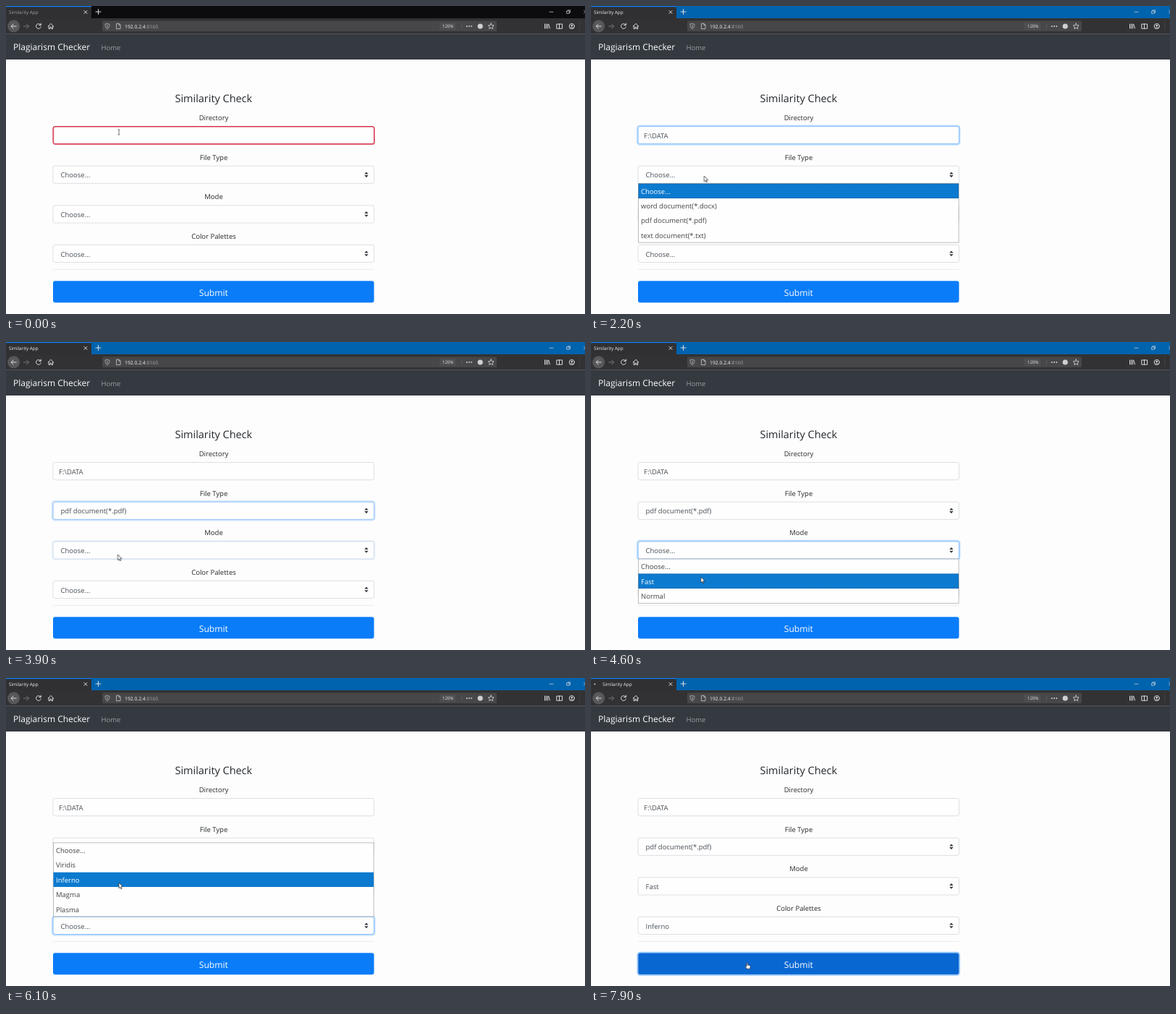
An HTML page that plays this animation: 800 px wide and 426 px high, repeating every 8000 ms.

```html
<!DOCTYPE html>
<html lang="en">
<head>
<meta charset="utf-8">
<title>Similarity App</title>
<style>
html, body { margin: 0; width: 100%; height: 100%; overflow: hidden; background: #fdfdfd; }
svg { display: block; width: 100%; height: 100%; }
text { font: 9.5px "Open Sans", "Noto Sans", sans-serif; fill: #24282c; text-rendering: geometricPrecision; white-space: pre; }
.mid { text-anchor: middle; }
.field { fill: #fefefe; stroke: #d3d8dd; stroke-width: .8; }
.value { fill: #495057; }
.item { fill: #444; }
.hot .item { fill: #fff; }
.icon { fill: none; stroke: #dcdcdd; stroke-width: 1; stroke-linecap: round; stroke-linejoin: round; }
.step, .fade, #pointer { animation: 8s step-end -20ms infinite; }
.fade { animation-timing-function: linear; }
#tabText { animation-name: tabText; }
#pointer { animation-name: pointer; }

@keyframes tabText {
  0% { fill: #a2a2a4; transform: none; }
  1.25% { fill: #f2f2f2; transform: none; }
  98.75%, 100% { fill: #f2f2f2; transform: translateX(12px); }
}
/* each leg advances once every 100 ms */
@keyframes pointer {
  0% { transform: translate(156px, 174.5px); }
  21.25% { transform: translate(156px, 174.5px); animation-timing-function: steps(5); }
  27.5% { transform: translate(156.3px, 235px); }
  31.25% { transform: translate(156.3px, 235px); animation-timing-function: steps(5); }
  37.5% { transform: translate(154.5px, 292px); }
  46.25% { transform: translate(154.5px, 294px); }
  52.5% { transform: translate(154.5px, 294px); animation-timing-function: steps(4); }
  57.5% { transform: translate(151.8px, 325px); }
  60% { transform: translate(151.8px, 325px); animation-timing-function: steps(3); }
  63.75% { transform: translate(157.5px, 338px); }
  72.5% { transform: translate(157.8px, 324.5px); animation-timing-function: steps(3); }
  76.25% { transform: translate(156px, 283px); }
  85% { transform: translate(156px, 283px); animation-timing-function: steps(5); }
  91.25% { transform: translate(211.7px, 384px); animation-timing-function: steps(3); }
  95%, 100% { transform: translate(215.7px, 393.3px); }
}
</style>
</head>
<body>
<svg id="stage" viewBox="0 0 800 426" xmlns="http://www.w3.org/2000/svg"></svg>
<script>
const LOOP = 8000, LEFT = 65, WIDE = 443.5, ROW = 20.4;
const at = ms => ms / LOOP * 100 + '%';
let css = '', id = 0;

const addKeys = body => {
  const name = 'k' + id++;
  css += `@keyframes ${name}{${body}}`;
  return `style="animation-name:${name}"`;
};

// visible from a to b with hard edges
const show = (a, b, inner) => `<g class="step" ${addKeys(
  `0%{opacity:0}${at(a)}{opacity:1}${at(b)}{opacity:0}100%{opacity:0}`)}>${inner}</g>`;

// visible from a to b, taking 100 ms to come and go
const fade = (a, b, inner) => `<g class="fade" ${addKeys(
  `0%,${at(a)}{opacity:0}${at(a + 100)},${at(b)}{opacity:1}${at(b + 100)},100%{opacity:0}`)}>${inner}</g>`;

const text = (x, y, str, cls = '', extra = '') => `<text x="${x}" y="${y}" class="${cls}" ${extra}>${str}</text>`;
const sized = px => `style="font-size:${px}px"`;
const rect = (x, y, w, h, attrs) => `<rect x="${x}" y="${y}" width="${w}" height="${h}" ${attrs}/>`;
const icon = (d, attrs = '') => `<path class="icon" d="${d}" ${attrs}/>`;
const label = (y, str) => text(287, y, str, 'mid');
const box = y => rect(LEFT, y, WIDE, 24.2, 'rx="2.5" class="field"');

const ring = (y, a, b) => fade(a, b,
  rect(LEFT - 1, y - 1, WIDE + 2, 26.2, 'rx="3.5" fill="none" stroke="#bfdeff" stroke-width="2"') +
  rect(LEFT, y, WIDE, 24.2, 'rx="2.5" fill="none" stroke="#80bdff" stroke-width=".9"'));

const select = (y, pick, when) => box(y) +
  show(0, when, text(75.5, y + 16.2, 'Choose...', 'value')) +
  show(when, LOOP, text(75.5, y + 16.2, pick, 'value')) +
  `<path fill="#343a40" d="M495.2 ${y + 11.3}l2.7-3.1 2.7 3.1zM495.2 ${y + 12.9}l2.7 3.1 2.7-3.1z"/>`;

// open list; moves holds [time, row] pairs of the highlight
const list = (y, open, close, items, moves) => {
  const h = items.length * ROW, clip = 'clip' + id;
  const rows = items.map((s, i) => text(69, y + i * ROW + 14, s, 'item')).join('');
  const keys = addKeys(moves.map(([t, r]) => `${at(t)}{transform:translateY(${r * ROW}px)}`).join(''));
  return show(open, close,
    rect(LEFT + .4, y, WIDE - .8, h, 'fill="#fefefe" stroke="#a9abad" stroke-width=".8"') + rows +
    `<clipPath id="${clip}">${rect(LEFT, y, WIDE, ROW, 'class="step" ' + keys)}</clipPath>
     <g class="hot" clip-path="url(#${clip})">${rect(LEFT + .5, y, WIDE - 1, h, 'fill="#0c7acf"')}${rows}</g>`);
};

const dotted = (y, h) => rect(LEFT + .8, y, WIDE - 1.6, h,
  'fill="none" stroke="#164f80" stroke-width=".7" stroke-dasharray="1 1"');

const browser = () =>
  rect(0, 0, 800, 18, 'fill="#0c0c0e"') +
  show(100, LOOP, rect(118, 0, 682, 18, 'fill="#0063ae"')) +
  rect(0, 0, 118, 18, 'fill="#303033"') +
  rect(0, 0, 118, 1.2, 'fill="#0a84ff"') +
  rect(0, 17, 800, 21.5, 'fill="#323235"') +
  text(4, 10.6, 'Similarity App', 'step', 'id="tabText" font-size="6.3"').replace('font-size="6.3"', sized(6.3)) +
  show(7900, LOOP, '<circle cx="5.3" cy="8.5" r="1" fill="#c9d3dd"/>') +
  icon('M108 6.5l4 4m0-4l-4 4', 'stroke-width=".8"') +
  icon('M124 8h7m-3.5-3.5v7') +
  icon('M751 8.2h5M775 7h3.3v3.3H775zM776.3 7V5.7h3.3V9h-1.2M798.5 6l4 4m0-4l-4 4', 'style="stroke-width:.7"') +
  '<circle cx="10.6" cy="28" r="8.4" fill="#58585b"/>' +
  icon('M14.2 28H7.2m3-3l-3 3 3 3') +
  icon('M24.5 28h7m-3-3l3 3-3 3', 'style="stroke:#77777a"') +
  icon('M47.8 26a3.4 3.4 0 1 0 .5 2.8M48.3 24v2.5h-2.5') +
  icon('M58 28.2l3.9-3.8 3.9 3.8M59.2 27.6v4h1.7v-2.3h2v2.3h1.7v-4') +
  rect(133, 20.5, 545, 14.6, 'rx="1.5" fill="#474749"') +
  icon('M140 24.3l3 1c0 3.2-.8 5.1-3 6.4-2.2-1.3-3-3.2-3-6.4zM140 26v4', 'style="stroke:#b9b9bb;stroke-width:.8"') +
  icon('M153 24.3h3l2 2v5.3h-5zM156 24.3v2h2', 'style="stroke:#cfcfd0;stroke-width:.8"') +
  text(164, 30.5, '<tspan fill="#f4f4f4">192.0.2.4</tspan><tspan fill="#a3a3a6">:8160</tspan>', '', sized(6.8)) +
  rect(599, 23, 22.5, 10, 'rx="2" fill="#4f4f52"') +
  text(603, 30.2, '120%', '', 'style="font-size:6px;fill:#e4e4e4"') +
  rect(629, 24, .6, 8, 'fill="#626265"') +
  [636.8, 640, 643.2].map(x => `<circle cx="${x}" cy="28" r=".9" fill="#dcdcdd"/>`).join('') +
  '<circle cx="655.2" cy="28" r="3.6" fill="#d0d0d2"/>' +
  icon('M670.2 24l1.2 2.6 2.8.3-2.1 1.9.6 2.8-2.5-1.4-2.5 1.4.6-2.8-2.1-1.9 2.8-.3z', 'style="stroke-width:.8"') +
  icon('M744.5 25v6m2-6v6m2-6v6m1.3-5.7l1.7 5.6') +
  icon('M761.2 25h7.4v6.2h-7.4zM764.5 25v6.2') +
  '<circle class="icon" cx="781.8" cy="28" r="3.6"/><circle cx="781.8" cy="27" r="1.3" fill="#dcdcdd"/>' +
  icon('M779.8 30.4q2-2.2 4 0') +
  rect(792, 20, .6, 15, 'fill="#49494c"') +
  rect(0, 38.3, 800, 35.7, 'fill="#343a40"') +
  text(10, 61.4, 'Plagiarism Checker', '', 'style="font-size:12px;fill:#fff"') +
  text(131.5, 60.8, 'Home', '', 'style="fill:#9a9da0"');

const form = () =>
  text(286.8, 133.2, 'Similarity Check', 'mid', sized(14.45)) +
  label(158, 'Directory') + box(166.5) +
  show(0, 100,
    rect(LEFT + .6, 167.1, WIDE, 24.2, 'rx="2.5" fill="none" stroke="#e77886" stroke-width="1.4"') +
    rect(LEFT, 166.5, WIDE, 24.2, 'rx="2.5" fill="none" stroke="#d5304a" stroke-width="1"')) +
  ring(166.5, 100, 2300) +
  show(200, 800, rect(73, 173, .7, 12.4, 'fill="#333"')) +
  show(1400, LOOP, text(73, 183, 'F:\\DATA', 'value')) +
  label(212.7, 'File Type') + select(221.2, 'pdf document(*.pdf)', 3200) + ring(221.2, 2300, 3900) +
  label(267.3, 'Mode') + select(275.8, 'Fast', 4800) + ring(275.8, 3900, 5300) +
  label(321.8, 'Color Palettes') + select(330.3, 'Inferno', 6800) + ring(330.3, 5300, 7800) +
  rect(LEFT, 364.2, WIDE, .7, 'fill="#e6e6e6"') +
  rect(LEFT, 380.2, WIDE, 30, 'rx="3" fill="#0a7cf8"') +
  show(7900, LOOP,
    rect(LEFT - .5, 379.7, WIDE + 1, 31, 'rx="3.5" fill="#0967d2" stroke="#92c5fb" stroke-width="2"') +
    rect(LEFT + .8, 381, WIDE - 1.6, 28.4, 'rx="2" fill="none" stroke="#0a58b4" stroke-width=".6" stroke-dasharray="1 1"')) +
  text(286.8, 400.8, 'Submit', 'mid', 'style="font-size:12.1px;fill:#fff"');

const lists = () =>
  list(245.5, 2200, 3200, ['Choose...', 'word document(*.docx)', 'pdf document(*.pdf)', 'text document(*.txt)'],
    [[0, 0], [2800, 1], [3000, 2], [LOOP, 2]]) +
  show(2200, 2800, dotted(245.9, ROW - .6)) +
  list(300.1, 4000, 4800, ['Choose...', 'Fast', 'Normal'], [[0, 0], [4600, 1], [LOOP, 1]]) +
  show(4600, 4800, dotted(320.8, ROW - .6)) +
  list(227.9, 5400, 6800, ['Choose...', 'Viridis', 'Inferno', 'Magma', 'Plasma'],
    [[0, 0], [5900, 4], [6000, 3], [6100, 2], [LOOP, 2]]);

const beam = '<path d="M-1.5-3.4H1.5M0-3.4V3.4M-1.5 3.4H1.5" fill="none" stroke="#555" stroke-width=".8"/>';
const arrow = '<path d="M0 0V7.8L1.8 6.2 2.9 8.8 4.1 8.3 3 5.7H5.4Z" fill="#fff" stroke="#222" stroke-width=".7"/>';
const hand = `<path d="M-.8.8Q0-.4.8.8V3.7L3.9 4.4Q4.7 4.7 4.5 5.7L3.8 9H-.3L-2.6 5.9Q-2.6 4.9-1.6 5.2L-.8 5.9Z"
  fill="#fff" stroke="#222" stroke-width=".7"/>`;

const pointer = () => `<g id="pointer">${
  show(0, 1000, beam) + show(1700, 1900, beam) + show(1900, 7300, arrow) + show(7300, LOOP, hand)}</g>`;

const markup = browser() + form() + lists() + pointer();
const sheet = document.createElement('style');
sheet.textContent = css;
document.head.append(sheet);
document.getElementById('stage').innerHTML = markup;
</script>
</body>
</html>
```
